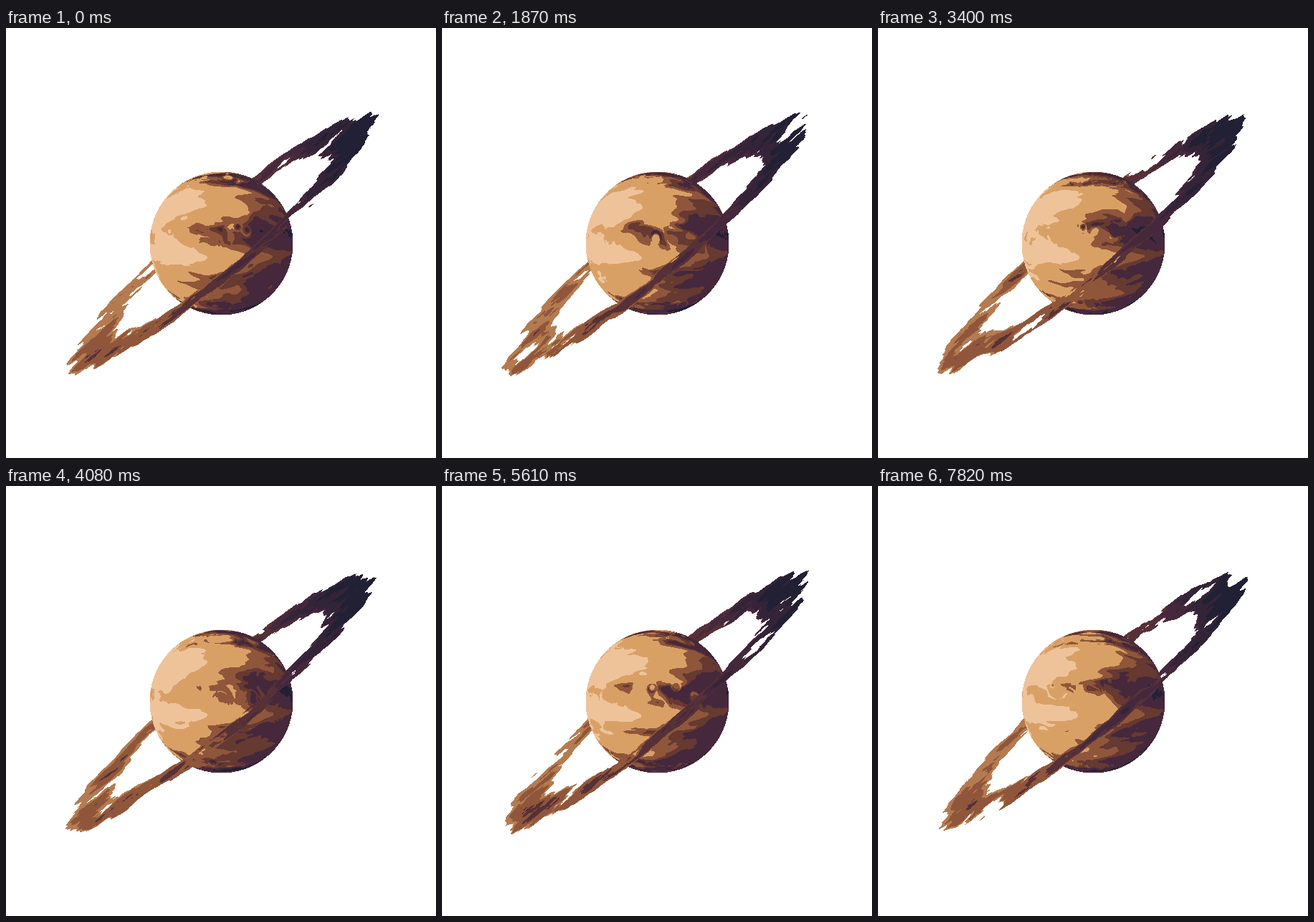
An HTML page with a canvas for the animation above (7990 ms loop, 600 by 600 pixels).

```html
<!DOCTYPE html>
<html lang="en">
<head>
<meta charset="utf-8">
<title>Ringed gas planet</title>
<style>
  html, body { margin: 0; width: 100%; height: 100%; overflow: hidden; background: #fff; }
  canvas { display: block; width: 100vw; height: 100vh; image-rendering: pixelated; }
</style>
</head>
<body>
<canvas id="stage" width="600" height="600"></canvas>
<script>
const SIZE = 600, DISC = 200, OFFSET = 200;
const STEP_MS = 170, STEPS = 47, TURN_STEPS = 60;
const SEED = 6.32;
const SPIN = 6.28; // just short of a full turn, shared by disc and ring
const LIGHT = { x: -0.1, y: 0.3 };
const PLANET = { size: 10.107, octaves: 3, bands: 0.892, angle: SPIN };
const RING = { size: 15, octaves: 4, width: 0.127, tilt: 6, angle: SPIN + 0.7, cutoff: 0.28 };
const LIT = [[238, 195, 154], [217, 160, 102], [143, 86, 59]];
const SHADE = [[102, 57, 49], [69, 40, 60], [34, 32, 52]];

const ctx = document.getElementById('stage').getContext('2d');
const image = ctx.createImageData(SIZE, SIZE);
const pixels = new Uint32Array(image.data.buffer);

const fract = v => v - Math.floor(v);
const wrap = (v, n) => ((v % n) + n) % n;

function smoothstep(a, b, v) {
  const k = Math.min(1, Math.max(0, (v - a) / (b - a)));
  return k * k * (3 - 2 * k);
}

function rotator(angle) {
  const c = Math.cos(angle), s = Math.sin(angle);
  return (x, y) => [x * c - y * s, x * s + y * c];
}

// Three-stop gradient, packed as ABGR
function ramp(stops, v) {
  const p = Math.min(1, Math.max(0, v)) * 2;
  const i = Math.min(1, Math.floor(p));
  const [r, g, b] = stops[i].map((c, n) => Math.round(c + (stops[i + 1][n] - c) * (p - i)));
  return (255 << 24 | b << 16 | g << 8 | r) >>> 0;
}

// Hash in single precision
const f32 = Math.fround;
const hash = (x, y) =>
  fract(Math.sin(f32(f32(12.9898) * x + f32(78.233) * y)) * f32(15.5453) * f32(SEED));

// Tiling value noise on a lattice twice as wide as it is high
function makeNoise(size, octaves) {
  const rows = Math.round(size), cols = rows * 2;
  const lattice = Float64Array.from({ length: rows * cols },
    (_, i) => hash(i % cols, Math.floor(i / cols)));
  const rand = (x, y) => lattice[wrap(y, rows) * cols + wrap(x, cols)];

  function noise(x, y) {
    const ix = Math.floor(x), iy = Math.floor(y);
    const fx = x - ix, fy = y - iy;
    const x0 = wrap(ix, cols), x1 = wrap(ix + 1, cols);
    const r0 = wrap(iy, rows) * cols, r1 = wrap(iy + 1, rows) * cols;
    const u = fx * fx * (3 - 2 * fx), v = fy * fy * (3 - 2 * fy);
    const top = lattice[r0 + x0] * (1 - u) + lattice[r0 + x1] * u;
    const bottom = lattice[r1 + x0] * (1 - u) + lattice[r1 + x1] * u;
    return top + (bottom - top) * v;
  }

  function fbm(x, y) {
    let sum = 0, scale = 0.5;
    for (let i = 0; i < octaves; i++) {
      sum += noise(x, y) * scale;
      x *= 2;
      y *= 2;
      scale *= 0.5;
    }
    return sum;
  }
  return { rand, fbm };
}

const gas = makeNoise(PLANET.size, PLANET.octaves);
const dust = makeNoise(RING.size, RING.octaves);

const gasColors = [ramp(LIT, 0), ramp(LIT, 0.5), ramp(LIT, 1),
                   ramp(SHADE, 0), ramp(SHADE, 0.5), ramp(SHADE, 1)];
const ringColors = Array.from({ length: 17 }, (_, i) =>
  i <= 4 ? ramp(LIT, i / 4) : ramp(SHADE, i / 4 - 1));

function storm(x, y) {
  const row = Math.floor(y);
  x += row * 0.31;
  const col = Math.floor(x);
  const h = gas.rand(col, row);
  if (h === 0) return 1;
  const mid = 0.25 + h * 0.5;
  const d = Math.hypot(x - col - mid, y - row - mid);
  return smoothstep(0, h * 0.25, d * 0.75);
}

function turbulence(x, y, shift) {
  let sum = 0;
  for (let i = 11; i <= 20; i++) sum += storm(x + i + shift, y + i);
  return sum;
}

// Everything about the disc that does not change with time
function buildDisc() {
  const list = [];
  const rotate = rotator(PLANET.angle);
  for (let py = 0; py < DISC; py++) {
    for (let px = 0; px < DISC; px++) {
      const u = px / DISC, v = py / DISC;
      if (Math.hypot(u - 0.5, v - 0.5) > 0.49999) continue;
      const [cx, cy] = rotate(u * 2 - 1, v * 2 - 1);
      const bulge = Math.sqrt(1 - cx * cx - cy * cy) + 1;
      const x = (cx / bulge * 0.5 + 0.5) * PLANET.size;
      const y = (cy / bulge * 0.5 + 0.5) * PLANET.size;
      const band = gas.fbm(0, y * PLANET.bands);
      list.push({
        at: (py + OFFSET) * SIZE + px + OFFSET,
        x, y,
        warp: gas.fbm(x, y),
        gain: band * band * 7,
        light: Math.hypot(u - LIGHT.x, v - LIGHT.y)
      });
    }
  }
  return list;
}

function buildRing() {
  const list = [];
  const rotate = rotator(RING.angle);
  for (let py = 0; py < SIZE; py++) {
    for (let px = 0; px < SIZE; px++) {
      const u = px / SIZE, v = py / SIZE;
      const [x, flat] = rotate(u - 0.5, v - 0.5);
      const y = flat * RING.tilt;
      const d = Math.hypot(x, y);
      const mask = smoothstep(0.5 - RING.width * 2, 0.5 - RING.width, d) *
                   smoothstep(d - RING.width, d, 0.4);
      const hidden = flat < 0 && Math.hypot(x, flat) < 1 / 6;
      if (hidden || mask < RING.cutoff) continue;
      const light = (u - LIGHT.x) ** 2 + (v - LIGHT.y) ** 2;
      list.push({ at: py * SIZE + px, x, y, mask, light: light * 2 });
    }
  }
  return list;
}

const disc = buildDisc();
const ring = buildRing();

function drawDisc(turn) {
  const shift = turn * Math.round(PLANET.size) * 2;
  for (const p of disc) {
    const push = p.warp + turbulence(p.x * 0.3, p.y * 0.3, shift);
    const cloud = gas.fbm(p.x + push - shift, p.y * 2 + push) * p.gain;
    const tone = smoothstep(-0.2, 4.3 - cloud - p.light, cloud + p.light * 1.8);
    const level = Math.floor(tone * 4);
    pixels[p.at] = gasColors[tone < 0.625 ? level : level + 1];
  }
}

function drawRing(turn) {
  const rotate = rotator(turn * Math.PI * 2);
  for (const p of ring) {
    const [x, y] = rotate(p.x, p.y);
    const value = p.mask * dust.fbm((x + 0.5) * RING.size, (y + 0.5) * RING.size);
    if (value < RING.cutoff) continue;
    pixels[p.at] = ringColors[Math.floor((value + p.light) * 4)];
  }
}

let shown = -1;
function tick() {
  const step = Math.floor(performance.now() / STEP_MS) % STEPS;
  if (step !== shown) {
    shown = step;
    pixels.fill(0xffffffff);
    drawDisc(step / TURN_STEPS);
    drawRing(step / TURN_STEPS);
    ctx.putImageData(image, 0, 0);
  }
  requestAnimationFrame(tick);
}
tick();
</script>
</body>
</html>
```
